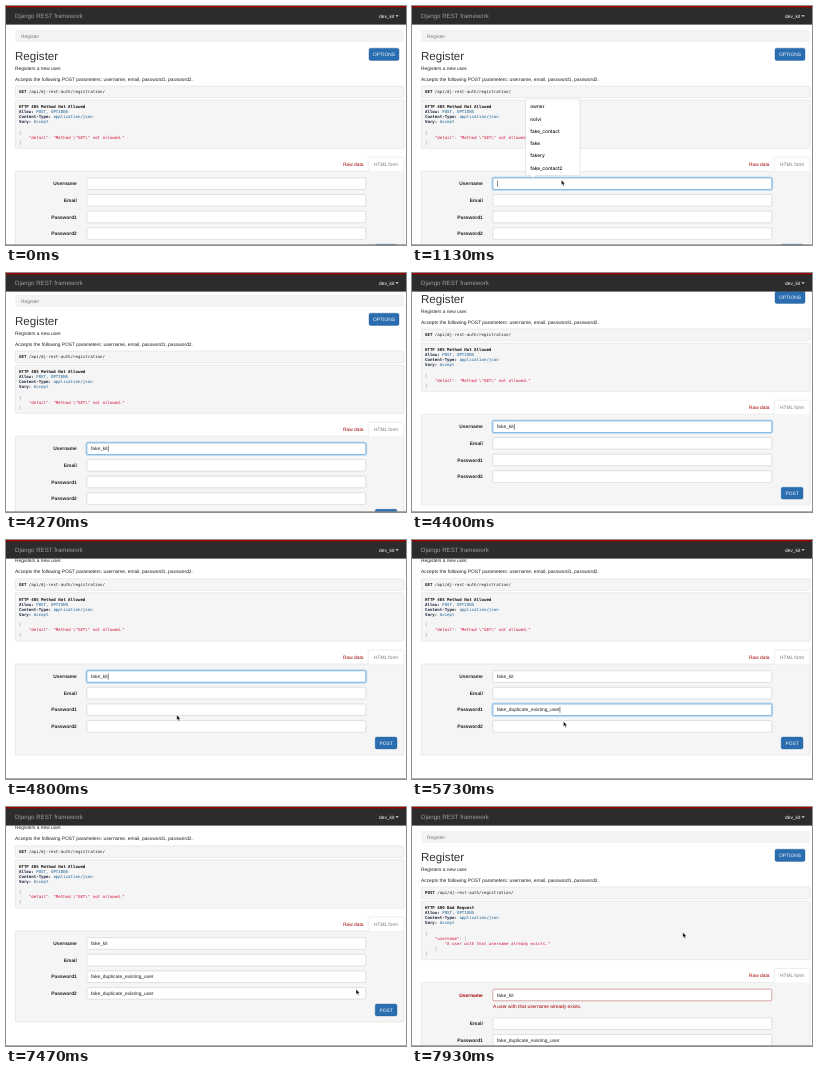
Write an HTML page that moves like this. It is 400 px wide and 239 px high and loops after 8000 ms.

```html
<!DOCTYPE html>
<html lang="en">
<head>
<meta charset="utf-8">
<title>Register</title>
<style>
html, body { margin: 0; width: 100%; height: 100%; overflow: hidden; background: #fff; }
svg { display: block; width: 100vw; height: 100vh; }
text { font: 4.85px "Liberation Sans", Arial, sans-serif; fill: #222; white-space: pre; text-rendering: geometricPrecision; }
.bold, .label { font-weight: 700; }
.label { text-anchor: end; }
.mono { font: 4.08px "DejaVu Sans Mono", "Liberation Mono", monospace; }
.mono .key { font-weight: 700; fill: #1b2440; }
.mono .head { font-weight: 700; fill: #111; }
.mono .lit { fill: #195f91; }
.mono .str { fill: #d1143c; }
.mono .pun { fill: #8d9797; }
.brand { font-size: 6.15px; fill: #9d9d9d; }
.title { font-size: 11.6px; fill: #333; }
.muted { fill: #777; }
.white { fill: #fff; }
.red { fill: #a30000; }
.box { fill: #f5f5f5; stroke: #d6d6d6; stroke-width: .45; }
.input { fill: #fff; stroke: #c4c4c4; stroke-width: .5; }
.button { fill: #2a6db0; stroke: #245f9b; stroke-width: .4; }
.button.hover { fill: #204d7a; }
.glow { fill: none; stroke: #66afe9; }
.caret { fill: #222; }
.popup text { font: 500 4.8px Inter, Roboto, sans-serif; fill: #111; }
.error .label { fill: #a30000; }
.error .input { stroke: #b0504e; }
</style>
</head>
<body>
<svg id="stage" viewBox="0 0 400 239" preserveAspectRatio="none"></svg>
<script>
const LOOP = 8000;
const USER = "fake_kit";
const PASSWORD = "fake_duplicate_existing_user";
const CONTACTS = ["", 2, 3, 4].map(n => "fake_contact" + n);
const LISTS = {
  all: ["owner", "nolvi", CONTACTS[0], "fake", "fakery", CONTACTS[1]],
  prefix: [CONTACTS[0], "fake", "fakery", CONTACTS[1], CONTACTS[2], "fake3"],
  longer: [CONTACTS[0], "fakery", CONTACTS[1], CONTACTS[2], "fake3", CONTACTS[3]]
};
// time at which each further character of the user name appears
const KEYS = [1670, 1800, 2070, 2200, 3270, 3530, 3600, 3800];
const ROW_TOP = 177.7, ROW_PITCH = 16.63;
const RESPONSE_SHIFT = 10.3, ERROR_SHIFT = 12;

const text = (x, y, s, cls = "") => `<text x="${x}" y="${y}" class="${cls}">${s}</text>`;
const rect = (x, y, w, h, cls, r = 1.2) =>
  `<rect x="${x}" y="${y}" width="${w}" height="${h}" rx="${r}" class="${cls}"/>`;
const span = (cls, s) => `<tspan class="${cls}">${s}</tspan>`;
const button = (x, y, w, h, label, id) =>
  `<g>${rect(x, y, w, h, "button", 1.6).replace("<rect", `<rect id="${id}"`)}
   <text x="${x + w / 2}" y="${y + h / 2 + 1.75}" text-anchor="middle" class="white">${label}</text></g>`;

function response(id, method, status, body) {
  const lines = [
    span("head", "HTTP " + status),
    span("key", "Allow:") + span("lit", " POST, OPTIONS"),
    span("key", "Content-Type:") + span("lit", " application/json"),
    span("key", "Vary:") + span("lit", " Accept"),
    "",
    ...body
  ];
  return `<g id="${id}">
    ${text(13, 87.4, span("head", method) + " /api/dj-rest-auth/registration/", "mono")}
    ${rect(9.3, 94, 388.5, 7.6 + lines.length * 5.1, "box")}
    ${lines.map((line, i) => text(13, 102 + i * 5.1, line, "mono")).join("")}
  </g>`;
}

const row = name => `<g class="row">
  ${text(70.8, 1.6, name, "label")}
  <rect class="glow" x="80.8" y="-5.8" width="279" height="11.6" rx="1.6" stroke-width="3" stroke-opacity=".35"/>
  ${rect(80.8, -5.8, 279, 11.6, "input")}
  <rect class="glow" x="80.8" y="-5.8" width="279" height="11.6" rx="1.2" stroke-width=".7"/>
  ${text(85, 1.6, "", "value")}
  <rect class="caret" y="-3" width=".55" height="6"/>
</g>`;

stage.innerHTML = `
<rect width="400" height="239" fill="#fff"/>
<g id="page">
  ${rect(9.3, 24, 388.5, 12, "breadcrumb", 1.2).replace("/>", ' fill="#f3f3f3"/>')}
  ${text(15, 31.8, "Register", "muted")}
  ${text(9, 54, "Register", "title")}
  ${button(363, 42.2, 30, 12.2, "OPTIONS", "options")}
  ${text(9, 63.7, "Registers a new user.")}
  ${text(9, 74.7, "Accepts the following POST parameters: username, email, password1, password2.")}
  ${rect(9.3, 80, 388.5, 11.6, "box")}
  ${response("before", "GET", "405 Method Not Allowed", [
    span("pun", "{"),
    "    " + span("str", '"detail"') + span("pun", ": ") + span("str", '"Method \\"GET\\" not allowed."'),
    span("pun", "}")
  ])}
  ${response("after", "POST", "400 Bad Request", [
    span("pun", "{"),
    "    " + span("str", '"username"') + span("pun", ": ["),
    "        " + span("str", '"A user with that username already exists."'),
    span("pun", "    ]"),
    span("pun", "}")
  ])}
  <g id="form">
    ${rect(9.3, 165.2, 388.5, 91, "box", .5)}
    <path d="M362.2 165.5V152.4q0-1.2 1.2-1.2h33.2q1.2 0 1.2 1.2v13.1" fill="#fff" stroke="#d6d6d6" stroke-width=".45"/>
    ${text(337, 160.1, "Raw data", "red")}
    ${text(368, 160.1, "HTML form", "muted")}
    ${["Username", "Email", "Password1", "Password2"].map(row).join("")}
    ${text(81, 190.4, "A user with that username already exists.", "red").replace("<text", '<text id="help"')}
    ${button(369.2, 238.3, 21.8, 11.8, "POST", "post")}
  </g>
</g>
<g id="popup" class="popup">
  <path d="M115 93h51.500q1.500 0 1.500 1.500v73.500q0 1.500-1.500 1.500H123.500l-2.500 2.500-2.500-2.500H115q-1.500 0-1.500-1.500V94.500q0-1.500 1.500-1.500z"
    fill="#fff" stroke="#000" stroke-opacity=".14" stroke-width=".6"/>
  ${LISTS.all.map((_, i) => text(118.2, 102.2 + i * 12.3, "")).join("")}
</g>
<rect width="400" height="18.600" fill="#2c2c2c"/>
<rect width="400" height="1.400" fill="#a30000"/>
${text(9, 12.400, "Django REST framework", "brand")}
${text(373, 11.800, "dev_kit", "white")}
<path d="M389.400 9.200h3.400l-1.700 1.900z" fill="#ddd"/>
<rect y="238.300" width="400" height=".7" fill="#8a8a8a"/>
<path id="pointer" d="M0 0v5l1.150-1 .85 1.900 .95-.4-.85-1.850h1.550z" fill="#000" stroke="#fff" stroke-width=".4"/>`;

const find = selector => [...stage.querySelectorAll(selector)];
const rows = find(".row").map(el => ({
  el,
  value: el.querySelector(".value"),
  caret: el.querySelector(".caret"),
  glows: [...el.querySelectorAll(".glow")]
}));
const items = find("#popup text");
const [page, form, before, after, help, post, popup, pointer] =
  ["page", "form", "before", "after", "help", "post", "popup", "pointer"].map(id => document.getElementById(id));

const ramp = (t, start, end) => Math.min(1, Math.max(0, (t - start) / (end - start)));
const within = (t, start, end) => t >= start && t < end;
const pulse = (t, start, end) => ramp(t, start, start + 200) * (1 - ramp(t, end, end + 200));
const show = (el, on) => el.setAttribute("visibility", on ? "visible" : "hidden");
const move = (el, x, y) => el.setAttribute("transform", `translate(${x} ${y})`);

// linear interpolation through [time, ...values] stops
function track(stops, t) {
  const i = stops.findIndex(stop => stop[0] > t);
  if (i < 0) return stops[stops.length - 1].slice(1);
  if (i === 0) return stops[0].slice(1);
  const [a, b] = [stops[i - 1], stops[i]];
  const k = ramp(t, a[0], b[0]);
  return a.slice(1).map((v, j) => v + (b[j + 1] - v) * k);
}

const POINTER = [
  [70, 352, 11], [130, 290, 62], [200, 212, 128], [270, 164, 166], [330, 149.4, 174],
  [1670, 149.4, 174], [4600, 182, 184], [4800, 170.8, 175], [5130, 160, 169], [5470, 157, 168.5],
  [5800, 150, 185], [6330, 150, 185], [6600, 352, 184], [6800, 364, 181], [7070, 376, 202],
  [7330, 377, 202], [7600, 325, 164], [7930, 270.8, 125.5]
];
const SCROLL = [[4000, 0], [4200, 1], [4270, 2], [4330, 10], [4400, 24], [4470, 36], [4530, 41.2]];

function draw(t) {
  const posted = t >= 7670;
  move(page, 0, posted ? 0 : -track(SCROLL, t)[0]);
  move(form, 0, posted ? RESPONSE_SHIFT : 0);
  show(before, !posted);
  show(after, posted);
  show(help, posted);
  post.classList.toggle("hover", within(t, 7000, 7470));

  const focus = [pulse(t, 530, 5130), 0, pulse(t, 5130, 5800), pulse(t, 5800, 7200)];
  const active = [within(t, 600, 5130), false, within(t, 5130, 5800), within(t, 5800, 7200)];
  const caretOff = [[1470, 1670], [2730, 3270], [6400, 7200]].some(([a, b]) => within(t, a, b));
  const values = [
    USER.slice(0, KEYS.filter(key => t >= key).length),
    "",
    t >= 5470 ? PASSWORD : "",
    t >= 6070 && !posted || posted ? PASSWORD : ""
  ];
  rows.forEach((r, i) => {
    move(r.el, 0, ROW_TOP + i * ROW_PITCH + (posted && i ? ERROR_SHIFT : 0));
    r.value.textContent = values[i];
    r.glows.forEach(glow => glow.setAttribute("opacity", posted ? 0 : focus[i]));
    show(r.caret, active[i] && !caretOff);
    r.caret.setAttribute("x", 85 + (values[i] ? r.value.getComputedTextLength() + .2 : 0));
  });
  rows[0].el.classList.toggle("error", posted);

  const list = t < 1670 ? LISTS.all : t < 3270 ? LISTS.prefix : LISTS.longer;
  items.forEach((item, i) => { item.textContent = list[i]; });
  popup.setAttribute("opacity", t < 3600 ? ramp(t, 800, 1000) : 0);

  show(pointer, within(t, 70, 1670) || t >= 4670);
  move(pointer, ...track(POINTER, t));
}

let last = -1;
function tick() {
  const step = Math.min(119, Math.floor((performance.now() % LOOP + 4) * .015));
  if (step !== last) draw(Math.round(step * 20 / 3) * 10);
  last = step;
  requestAnimationFrame(tick);
}
tick();
</script>
</body>
</html>
```
